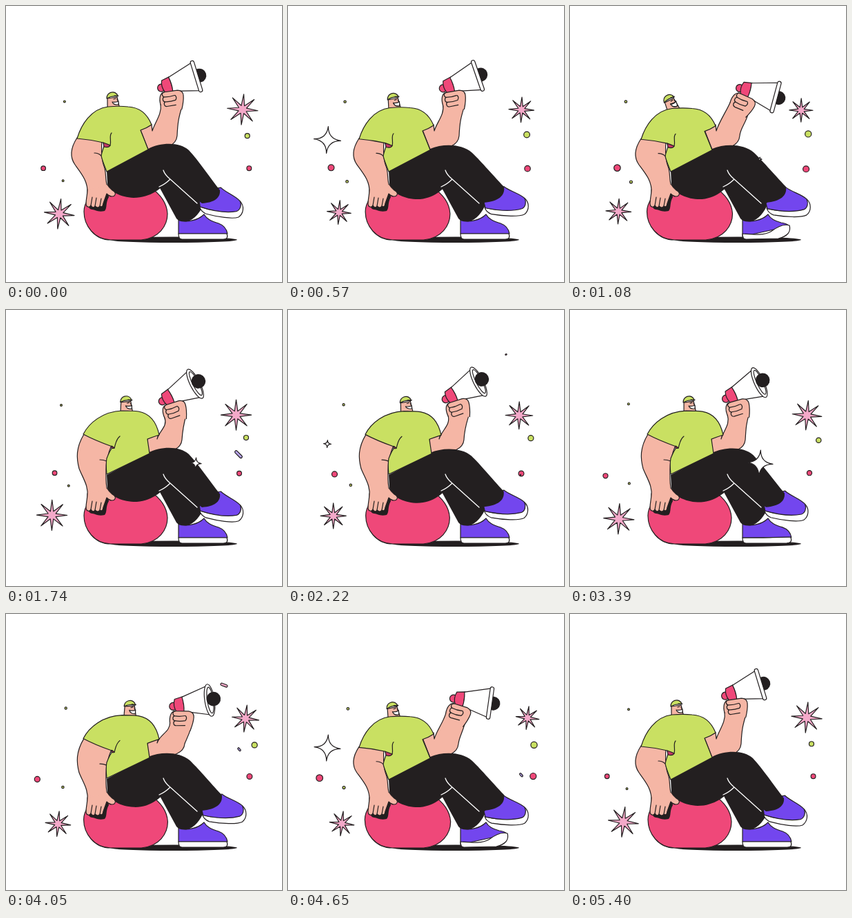
Animation of 400x400 px, one loop 5430 ms. Source, as an HTML page:

```html
<!DOCTYPE html>
<html lang="en">
<head>
<meta charset="utf-8">
<title>Megaphone</title>
<style>
  html, body { margin: 0; width: 100%; height: 100%; overflow: hidden; background: #fff; }
  svg { display: block; width: 100%; height: 100%; }
  svg * { stroke-linejoin: round; stroke-linecap: round; }
  .ink { stroke: #231f20; stroke-width: 1.2; }
  .line { fill: none; }
  .skin { fill: #f5b6a5; }
  .green { fill: #c9e062; }
  .pink { fill: #ef4879; }
  .rose { fill: #f4a9c9; }
  .violet { fill: #7346ee; }
  .lilac { fill: #b9a5f5; }
  .white { fill: #fff; }
  .black { fill: #231f20; }
</style>
</head>
<body>
<svg viewBox="0 0 400 400">
  <ellipse class="black" cx="243" cy="338.8" rx="92" ry="4.3"/>
  <path class="white" d="M200 300H250V334H200Z"/>
  <g id="ball">
    <path class="pink ink" d="M113 298C113 318 128 339 152 339L196 339C222 337 234 318 234 301C233 283 220 270 208 262L140 262C124 270 113 284 113 298Z"/>
  </g>

  <path id="upper" class="violet ink"/>
  <path id="sole" class="white ink"/>
  <path class="black" d="M222 262L247 308Q252 314 263 312Q278 308 288 284L250 235Z"/>
  <g id="shoe">
    <path class="white ink" d="M285 290C300 295 325 298 343 277C350 283 350 294 343 300C335 304 313 303 295 300Q287 297 285 290Z"/>
    <path class="violet ink" d="M313 260C322 267 336 270 343 277C346 283 344 290 339 292C325 296 305 295 286 291L284 283L300 264Z"/>
  </g>

  <path id="arm" class="skin ink"/>
  <g id="mega">
    <circle class="pink ink" cx="-53.5" cy="1" r="5.5"/>
    <path class="pink ink" d="M-38 -11L-50 -9Q-54 0 -50 9L-38 11Z"/>
    <circle id="backBall" class="black" cx="4.5" r="10"/>
    <path class="white ink" d="M-39 -10.5L0 -21.5V21.5L-39 10.5Q-37 0 -39 -10.5Z"/>
    <rect id="rim" class="white ink" y="-23.5" height="47"/>
    <g id="bell">
      <ellipse id="mouth" class="white ink" ry="19"/>
      <circle class="black" cx="6" cy="-1" r="10.3"/>
    </g>
    <g transform="translate(-44 23) rotate(12)">
      <path class="skin ink" d="M-17 5C-19 -5 -16 -13 -10 -13L9 -14Q17 -13 17 -6C17 2 15 8 13 14"/>
      <path class="line ink" d="M-10 -13C-15 -12 -14 -7 -11 -6C-14 -5 -14 1 -10 1C-13 3 -12 8 -8 8L5 7M-11 -6Q-4 -5 4 -7M-10 1Q-3 2 5 0M5 -7Q8 -4 5 0"/>
    </g>
  </g>

  <path id="pants" class="black"/>
  <path class="line" stroke="#fff" stroke-width="1.3" d="M228 238C230 244 233 247 238 251L277 286M238 251Q231 258 222 262"/>

  <g id="head">
    <path class="skin ink" d="M-9 3L-9 -13L5 -15L8 -2L9 3Z"/>
    <path class="green ink" d="M-10 -13C-10 -22 0 -25 5 -19L6 -16C1 -17 -5 -16 -10 -13Z"/>
    <path class="black ink" d="M1 -17L7 -17"/>
    <path class="line ink" d="M0 -12L3 -13M5 -12L6 -10"/>
    <path id="teeth" class="white ink" d="M-2 -8Q3 -7 7 -9L7 -4Q0 -3 -2 -8Z"/>
  </g>
  <g id="torso">
    <path id="limb" class="skin ink"/>
    <path id="elbow" class="line ink"/>
    <path id="shirt" class="green ink"/>
    <path id="cuff" fill="#c23a66" class="ink"/>
    <path id="fold" class="line ink"/>
  </g>
  <path class="black" d="M119 289C121 297 126 294 129 296C134 298 138 298 143 297C147 293 144 285 149 277L147 266L126 272Z"/>
  <path class="skin ink" d="M118 266C118 276 114 287 117 290Q120 293 123 289Q126 294 129 290Q133 294 136 290Q140 293 141 286L146 272Q152 278 157 275Q161 271 154 267Q149 263 147 259"/>
  <path class="line ink" d="M123 289L125 277M129 290L131 278M136 290L138 279"/>
  <g id="bits"></g>
</svg>
<script>
const LOOP = 5430, BEAT = LOOP / 3, TAU = Math.PI * 2;
const $ = id => document.getElementById(id);
const set = (el, attrs) => { for (const k in attrs) el.setAttribute(k, attrs[k]); };
const clamp = x => Math.max(0, Math.min(1, x));
const ease = x => { x = clamp(x); return x * x * (3 - 2 * x); };
const lerp = (a, b, k) => a + (b - a) * k;
const wave = (t, peak) => Math.cos(TAU * (t - peak) / LOOP);

// Blend two paths that share the same commands.
function blend([a, b], k) {
  const to = b.match(/-?[\d.]+/g);
  let i = 0;
  return a.replace(/-?[\d.]+/g, n => lerp(+n, +to[i++], k).toFixed(2));
}

// Keys are [time, ...values], eased from one to the next.
function track(t, keys) {
  const i = keys.findIndex(k => k[0] > t), a = keys[i - 1], b = keys[i];
  const k = ease((t - a[0]) / (b[0] - a[0]));
  return a.slice(1).map((v, j) => lerp(v, b[j + 1], k));
}

const shapes = {
  shirt: [
    "M103 192C109 172 123 149 148 146C159 145 168 145 177 146C195 147 205 157 211 172Q204 177 195 180C199 190 203 200 206 208L146 240C142 230 139 222 138 217C139 211 141 207 142 203L141 198C128 195 115 193 103 192Z",
    "M112 180C120 164 140 147 168 146C178 146 185 146 192 147C209 150 218 162 222 181Q213 184 205 187C206 195 207 200 208 208L146 238C145 228 145 220 146 215C148 210 150 205 153 201L154 198C140 193 125 187 112 180Z"],
  limb: [
    "M103 191C92 208 93 220 100 230C111 245 119 255 118 272L147 262C143 250 146 242 142 232C138 222 138 210 139 194",
    "M113 180C101 200 102 215 106 230C112 245 120 255 118 272L147 262C144 250 145 242 145 232C145 222 147 210 153 196"],
  elbow: ["M128 213Q134 213 138 217", "M136 217Q141 217 146 219"],
  cuff: ["M141 198Q147 200 151 202Q149 206 142 204Z", "M153 197Q155 198 157 200Q156 201 153 200Z"],
  fold: ["M151 202C153 195 149 188 153 184", "M157 200C159 194 159 188 165 183"],
};
const pants = [
  "M146 239L206 207C225 199 252 200 266 212C277 222 295 243 313 262C315 275 305 283 284 285L238 251C225 266 210 281 185 280C166 279 150 270 147 258Z",
  "M146 239L206 207C225 197 252 197 265 209C279 224 296 249 310 267C311 278 302 285 284 286L238 251C225 264 210 278 185 278C166 277 150 269 147 258Z"];
const soles = [
  "M250 330C265 330 277 330 290 330C302 330 312 330 320 330Q323 338 315 338L255 338Q250 338 250 330Z",
  "M250 330C265 331 281 333 291 327C299 321 309 315 318 318Q322 332 302 337L255 338Q250 338 250 330Z"];
const uppers = [
  "M250 310C262 314 278 311 287 302C291 309 298 312 308 315Q319 319 321 330L250 330Z",
  "M250 310C262 314 278 311 287 302C291 309 298 312 306 314Q314 315 318 319L250 334Z"];

// rim x, rim y, tilt, elbow x
const megaKeys = [
  [0, 276, 102, -17, 248], [600, 275, 101, -19, 248], [1080, 298, 132, 15, 246],
  [1230, 297, 131, 14, 246], [1740, 274, 107, -27, 255], [2200, 276, 104, -27, 255],
  [2700, 270, 105, -26, 252], [3350, 274, 105, -25, 254], [4050, 295, 125, -8.5, 259],
  [4300, 297, 124, -3, 256], [4650, 293, 129, 8, 247], [5130, 276, 103, -16, 248],
  [LOOP, 276, 102, -17, 248]];
// neck x, tilt, mouth opening
const headKeys = [
  [0, 156, 0, 1], [540, 155, -3, 1.2], [1080, 150, -18, 1.4], [1740, 175, 3, 1],
  [2700, 170, -4, .7], [3350, 174, 0, 1], [4050, 180, 5, 1.1], [4650, 154, -4, 1.2],
  [LOOP, 156, 0, 1]];

const bits = $("bits");
function add(tag, cls) {
  const el = document.createElementNS("http://www.w3.org/2000/svg", tag);
  el.setAttribute("class", cls);
  return bits.appendChild(el);
}

// class, x, x swing, x peak, y, y swing, y peak, radius, pulse
const dots = [
  ["pink", 57.7, 13, 1600, 237.3, 3, 3400, 4.1, .8],
  ["pink", 346.5, 8.8, 4700, 236, 1, 2200, 4, .6],
  ["green", 353, 7.8, 3700, 187.5, 2.5, 4300, 4.1, .6],
  ["green", 83.5, 3.5, 4415, 137.5, 1.3, 700, 1.6, .2],
  ["green", 86, 5, 2000, 253, 2, 1250, 1.7, .3],
].map(d => [add("circle", d[0] + " ink"), ...d.slice(1)]);

// x, x swing, x peak, y, y swing, y peak, radius, pulse, phase
const stars = [
  [340.5, 7, 4365, 151.5, 1.5, 2715, 19.4, 2.8, 0],
  [72, 6.3, 4915, 300.7, 3.5, 4215, 19.5, 2.7, .08],
].map(s => [add("path", "rose ink"), ...s]);

// x, y, peak time, half life, radius
const glints = [
  ...[585, 2500, 4600].map(p => [57, 194, p, 340, 19.5]),
  ...[1447, 3400].map(p => [275, 222, p, 407, 19]),
].map(g => [add("path", "white ink"), ...g]);

// class, x, start y, start time, angle
const pills = [
  ["lilac", 337, 190, 1430, 45], ["rose", 316, 62, 2180, -8],
  ["rose", 316, 66, 3450, 20], ["lilac", 338, 190, 3950, 50],
].map(p => [add("rect", p[0] + " ink"), ...p.slice(1)]);

function burst(points, r, inner, turn) {
  let d = "";
  for (let i = 0; i < points * 2; i++) {
    const a = turn + i * Math.PI / points - Math.PI / 2, q = i % 2 ? r * inner : r;
    d += (i ? "L" : "M") + (q * Math.cos(a)).toFixed(2) + " " + (q * Math.sin(a)).toFixed(2);
  }
  return d + "Z";
}

function drawBits(t) {
  const pulse = phase => Math.cos(TAU * (t / BEAT + phase));
  for (const [el, x, dx, px, y, dy, py, r, dr] of dots)
    set(el, { cx: x + dx * wave(t, px), cy: y + dy * wave(t, py), r: r - dr * pulse(0) });

  for (const [el, x, dx, px, y, dy, py, r, dr, ph] of stars)
    set(el, {
      d: burst(8, r + dr * pulse(ph), .27, .06 + .06 * wave(t, px)),
      transform: `translate(${x + dx * wave(t, px)} ${y + dy * wave(t, py)})`,
    });

  for (const [el, x, y, peak, half, size] of glints) {
    const k = 1 - Math.abs(t - peak) / half, r = size * Math.sin(clamp(k) * Math.PI / 2), c = r * .06;
    set(el, {
      d: `M0 ${-r}Q${c} ${-c} ${r} 0Q${c} ${c} 0 ${r}Q${-c} ${c} ${-r} 0Q${-c} ${-c} 0 ${-r}Z`,
      transform: `translate(${x} ${y}) rotate(4)`,
      visibility: k > 0 ? "visible" : "hidden",
    });
  }

  for (const [el, x, y, start, turn] of pills) {
    const q = (t - start) / 810, s = Math.sin(clamp(q) * Math.PI), w = 14.5 * s, h = 4 * Math.sqrt(s);
    set(el, {
      x: -w / 2, y: -h / 2, width: w, height: h, rx: h / 2,
      transform: `translate(${x} ${y + 50 * q}) rotate(${turn})`,
      visibility: s > .03 ? "visible" : "hidden",
    });
  }
}

function drawArm(turn, x, y, tilt, ex) {
  const at = (px, py, deg, ox, oy) => {
    const a = deg * Math.PI / 180, c = Math.cos(a), s = Math.sin(a);
    return [ox + px * c - py * s, oy + px * s + py * c];
  };
  const palm = at(-44, 23, tilt, x, y);
  const hand = (px, py) => at(px, py, tilt + 12, ...palm);
  const [wx, wy] = hand(-17, 4), [cx, cy] = hand(-16, 18), [rx, ry] = hand(14, 9);
  const ix = lerp(212, 219, turn), iy = lerp(181, 187, turn);
  const sleeve = blend(["M195 180L211 172", "M205 187L221 180"], turn);
  set($("arm"), {
    d: `${sleeve}L${ix} ${iy}C${ix + 4} ${iy - 13} ${cx} ${cy} ${wx} ${wy}` +
       `L${rx} ${ry}C${rx - 4} ${ry + 14} ${ex + 1} ${ry + 20} ${ex} 188C${ex - 1} 200 ${ex - 12} 208 206 208Z`,
  });
}

function draw(t) {
  const phase = t / BEAT % 1, swing = Math.cos(TAU * phase);
  const bob = ((1 - swing) / 2) ** 2;
  const turn = ease((t - 1180) / 500) - ease((t - 4120) / 480);
  const kick = Math.max(0, swing);
  const lift = ease((phase - .495) / .07) * (1 - ease((phase - .62) / .3));

  set($("ball"), { transform: `translate(173.5 0) scale(${1 + .03 * bob} 1) translate(-173.5 0)` });
  set($("sole"), { d: blend(soles, lift) });
  set($("upper"), { d: blend(uppers, lift) });
  set($("pants"), { d: blend(pants, kick) });
  set($("shoe"), { transform: `translate(${-4 * kick} ${3.5 * bob}) rotate(${6 * kick} 285 284)` });

  for (const id in shapes) set($(id), { d: blend(shapes[id], turn) });
  set($("torso"), { transform: `translate(0 238) scale(1 ${1 - .033 * bob}) translate(0 -238)` });

  const [hx, tilt, open] = track(t, headKeys);
  set($("head"), { transform: `translate(${hx} ${147 + 3 * bob}) rotate(${tilt})` });
  set($("teeth"), { transform: `translate(0 -7) scale(1 ${open}) translate(0 7)` });

  const [x, y, angle, ex] = track(t, megaKeys);
  const half = lerp(2.7, 7, turn), front = turn > .5;
  set($("mega"), { transform: `translate(${x} ${y}) rotate(${angle})` });
  set($("rim"), { x: -half, width: half * 2, rx: half, ry: lerp(2.7, 23.5, turn) });
  set($("mouth"), { cx: 1, rx: half * .62 });
  set($("bell"), { visibility: front ? "visible" : "hidden" });
  set($("backBall"), { visibility: front ? "hidden" : "visible" });
  drawArm(turn, x, y, angle, ex);
  drawBits(t);
}

const start = performance.now();
function tick() {
  draw((performance.now() - start) % LOOP);
  requestAnimationFrame(tick);
}
tick();
</script>
</body>
</html>
```
